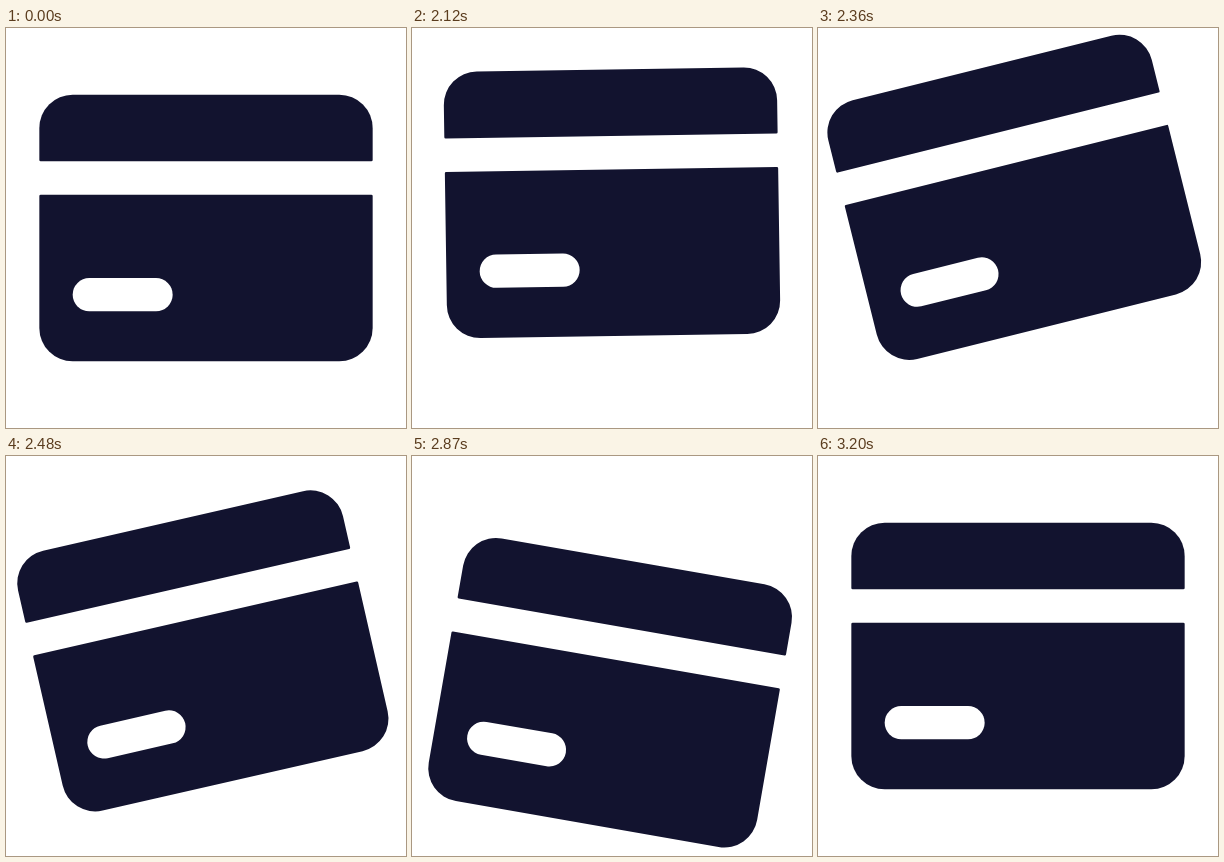
These frames come from a looping animation (400 by 400 pixels, 3230 ms). An HTML page with a canvas:

```html
<!DOCTYPE html>
<html lang="en">
<head>
<meta charset="utf-8">
<title>Card wobble</title>
<style>
  html, body { margin: 0; width: 100%; height: 100%; overflow: hidden; background: #fff; }
  canvas { display: block; width: 100vmin; height: 100vmin; }
</style>
</head>
<body>
<canvas id="stage" width="400" height="400"></canvas>
<script>
const ctx = document.getElementById('stage').getContext('2d');

const LOOP = 3230, REST = 2000, STEP = 30;
const UNIT = 400 / 24;   // the icon lives on a 24-unit grid
const PIVOT = { x: 75, y: 200 };
const INK = '#12132f';

// Keys are [step, value]; the card bobs up and down while it tilts.
const lift = curve([
  [0, 0], [1, -2], [4, -23.4], [6.4, -33.3], [10, -15], [12, -0.5],
  [18, 30], [20, 33.3], [21, 32.4], [29, 15.2], [36, 1.8], [40, 0]
]);
const tilt = curve([
  [0, 0], [2.1, 0], [4, -0.86], [8, -7.5], [12, -14], [13.8, -15],
  [18, -9.3], [21, -2.5], [26, 8.8], [28.5, 10], [36, 1.3], [40, 0]
]);

// Monotone cubic interpolation: smooth, flat at each extreme.
function curve(keys) {
  const last = keys.length - 1;
  const rate = i => (keys[i + 1][1] - keys[i][1]) / (keys[i + 1][0] - keys[i][0]);
  const slopes = keys.map((_, i) => {
    if (i === 0 || i === last) return 0;
    const a = rate(i - 1), b = rate(i);
    if (a * b <= 0) return 0;
    const h0 = keys[i][0] - keys[i - 1][0], h1 = keys[i + 1][0] - keys[i][0];
    const w0 = 2 * h1 + h0, w1 = h1 + 2 * h0;
    return (w0 + w1) / (w0 / a + w1 / b);
  });
  return x => {
    let i = 0;
    while (i < last - 1 && x > keys[i + 1][0]) i++;
    const [x0, y0] = keys[i], [x1, y1] = keys[i + 1];
    const h = x1 - x0, t = (x - x0) / h, u = 1 - t;
    return y0 * (1 + 2 * t) * u * u + y1 * t * t * (3 - 2 * t)
      + h * t * u * (slopes[i] * u - slopes[i + 1] * t);
  };
}

function roundBox(x, y, w, h, radii, color) {
  ctx.fillStyle = color;
  ctx.beginPath();
  ctx.roundRect(x * UNIT, y * UNIT, w * UNIT, h * UNIT, radii.map(r => r * UNIT));
  ctx.fill();
}

function drawCard() {
  const round = 2, sharp = 0.08;
  roundBox(2, 4, 20, 4, [round, round, sharp, sharp], INK);
  roundBox(2, 10, 20, 10, [sharp, sharp, round, round], INK);
  roundBox(4, 15, 6, 2, [1], '#fff');
}

function render(now) {
  const time = now % LOOP;
  const step = Math.max(0, Math.floor((time - REST + 0.01) / STEP));
  ctx.setTransform(1, 0, 0, 1, 0, 0);
  ctx.fillStyle = '#fff';
  ctx.fillRect(0, 0, 400, 400);
  ctx.translate(PIVOT.x, PIVOT.y + lift(step));
  ctx.rotate(tilt(step) * Math.PI / 180);
  ctx.translate(-PIVOT.x, -PIVOT.y);
  drawCard();
}

const start = performance.now();
function tick() {
  render(performance.now() - start);
  requestAnimationFrame(tick);
}
tick();
</script>
</body>
</html>
```
